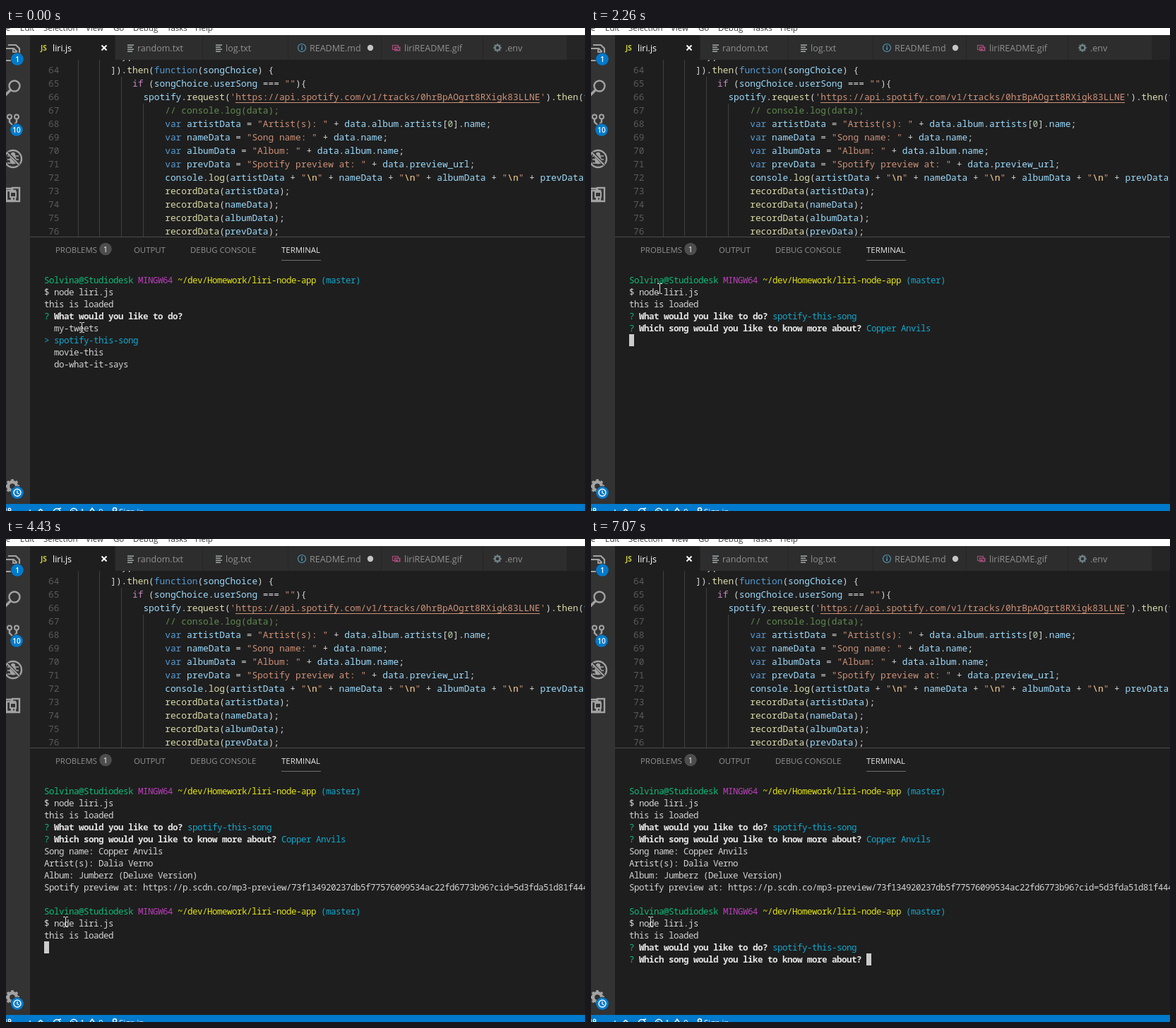
Recreate the animation shown at these times as an HTML page with a canvas. Size 820x683 px, loop 8 s.

```html
<!DOCTYPE html>
<html lang="en">
<head>
<meta charset="utf-8">
<title>Editor with terminal</title>
<style>
html, body { margin: 0; width: 100%; height: 100%; overflow: hidden; background: #1e1e1e; }
canvas { display: block; }
</style>
</head>
<body>
<canvas id="stage" width="820" height="683"></canvas>
<script>
const LOOP = 8000, TAU = Math.PI * 2;
const MONO = '"Noto Sans Mono", monospace', SANS = '"Open Sans", sans-serif';
const stage = document.getElementById('stage');
const backdrop = document.createElement('canvas');
backdrop.width = stage.width;
backdrop.height = stage.height;
let ctx = backdrop.getContext('2d');

// ---- drawing helpers ----
function rect(x, y, w, h, color) {
  ctx.fillStyle = color;
  ctx.fillRect(x, y, w, h);
}
function disc(x, y, r, color) {
  ctx.fillStyle = color;
  ctx.beginPath();
  ctx.arc(x, y, r, 0, TAU);
  ctx.fill();
}
function ring(x, y, r, color, width = 1) {
  ctx.strokeStyle = color;
  ctx.lineWidth = width;
  ctx.beginPath();
  ctx.arc(x, y, r, 0, TAU);
  ctx.stroke();
}
function line(color, width, ...points) {
  ctx.strokeStyle = color;
  ctx.lineWidth = width;
  ctx.beginPath();
  for (let i = 0; i < points.length; i += 2) ctx.lineTo(points[i], points[i + 1]);
  ctx.stroke();
}
function box(x, y, w, h, color, width = 2) {
  ctx.strokeStyle = color;
  ctx.lineWidth = width;
  ctx.strokeRect(x, y, w, h);
}
function label(text, x, y, size, color, align = 'left', weight = '') {
  ctx.font = `${weight} ${size}px ${SANS}`;
  ctx.fillStyle = color;
  ctx.textAlign = align;
  ctx.fillText(text, x, y);
}
function cells(text, x, y, pitch, size, color, bold) {
  ctx.font = `${bold ? 'bold ' : ''}${size}px ${MONO}`;
  ctx.fillStyle = color;
  ctx.textAlign = 'left';
  [...text].forEach((ch, i) => ch !== ' ' && ctx.fillText(ch, x + i * pitch, y));
}
function clipped(x, y, w, h, draw) {
  ctx.save();
  ctx.beginPath();
  ctx.rect(x, y, w, h);
  ctx.clip();
  draw();
  ctx.restore();
}
function gear(x, y, r, color, hole) {
  ring(x, y, r * 0.6, color, r * 0.45);
  for (let i = 0; i < 8; i++) {
    const c = Math.cos(i * TAU / 8), s = Math.sin(i * TAU / 8);
    line(color, r * 0.36, x + c * r * 0.7, y + s * r * 0.7, x + c * r, y + s * r);
  }
  disc(x, y, r * 0.33, hole);
}

// ---- editor ----
const CODE_X = 102, CODE_PITCH = 7.7;
const URL_TEXT = 'https://api.spotify.com/v1/tracks/0hrBpAOgrt8RXigk83LLNE';
const CODE = [
  [8, '},'],
  [6, ']).then(function(songChoice) {'],
  [10, 'if (songChoice.userSong === ""){'],
  [12, `spotify.request('${URL_TEXT}').then(function`],
  [16, '// console.log(data);'],
  [16, 'var artistData = "Artist(s): " + data.album.artists[0].name;'],
  [16, 'var nameData = "Song name: " + data.name;'],
  [16, 'var albumData = "Album: " + data.album.name;'],
  [16, 'var prevData = "Spotify preview at: " + data.preview_url;'],
  [16, 'console.log(artistData + "\\n" + nameData + "\\n" + albumData + "\\n" + prevData);'],
  [16, 'recordData(artistData);'],
  [16, 'recordData(nameData);'],
  [16, 'recordData(albumData);'],
  [16, 'recordData(prevData);']
];
const RULES = [
  [/^\/\/.*/, '#608b4e'],
  [/^(var|function)\b/, '#569cd6'],
  [/^if\b/, '#c586c0'],
  [/^("[^"]*"|'[^']*')/, '#ce9178'],
  [/^\w+(?=\()/, '#dcdcaa'],
  [/^\d+/, '#b5cea8'],
  [/^[a-z]\w*/i, '#9cdcfe'],
  [/^./, '#d4d4d4']
];
function codeLine(text, col, y) {
  while (text) {
    const [rule, color] = RULES.find(([re]) => re.test(text));
    const token = text.match(rule)[0];
    cells(token, CODE_X + col * CODE_PITCH, y, CODE_PITCH, 12.83, color);
    const escape = token.indexOf('\\n');
    if (escape >= 0) {
      cells('\\n', CODE_X + (col + escape) * CODE_PITCH, y, CODE_PITCH, 12.83, '#d7ba7d');
    }
    col += token.length;
    text = text.slice(token.length);
  }
}
function editor() {
  clipped(34, 45, 786, 250, () => {
    const guideTops = [45, 45, 69, 107];
    guideTops.forEach((top, i) => rect(Math.floor(CODE_X + i * 4 * CODE_PITCH), top, 1, 295 - top, '#404040'));
    CODE.forEach(([col, text], i) => {
      const y = 45 + i * 19;
      if (i) cells(String(63 + i), 60, y, CODE_PITCH, 12.83, '#5a5a5a');
      codeLine(text, col, y);
    });
    rect(325, 105, 431, 1, '#ce9178');
  });
}

// ---- window chrome ----
function menuBar() {
  rect(0, 0, 820, 10, '#ffffff');
  const items = { File: -12, Edit: 20, Selection: 53, View: 113, Go: 152, Debug: 180, Tasks: 228, Help: 268 };
  for (const name in items) label(name, items[name], 4, 11.5, '#333333');
}
function textIcon(x) {
  [24, 27, 30, 33].forEach((y, i) => rect(x, y - 0.5, i % 2 ? 7 : 9, 1.3, '#b4bbc0'));
}
function tabs() {
  rect(34, 10, 786, 35, '#252526');
  const list = [
    ['liri.js', 34, 120, 66], ['random.txt', 155, 123, 186], ['log.txt', 279, 120, 311],
    ['README.md', 400, 131, 430], ['liriREADME.gif', 532, 143, 564], ['.env', 676, 118, 707]
  ];
  list.forEach(([name, x, w, textX], i) => {
    rect(x, 10, w, 35, i ? '#2d2d2d' : '#1e1e1e');
    label(name, textX, 33, 12.5, i ? '#919191' : '#ffffff');
  });
  label('JS', 49, 32, 10, '#cbcb41', 'left', 'bold');
  line('#ffffff', 2, 135.5, 24.5, 142.5, 31.5);
  line('#ffffff', 2, 142.5, 24.5, 135.5, 31.5);
  textIcon(172);
  textIcon(297);
  ring(419, 28, 5.5, '#519aba', 1.2);
  rect(418.3, 27, 1.6, 4, '#519aba');
  rect(418.3, 24.6, 1.6, 1.5, '#519aba');
  disc(516, 28, 4.2, '#c5c5c5');
  box(547.5, 24.5, 8, 6, '#a04c78', 1.2);
  rect(550, 26.5, 8.5, 6, '#a04c78');
  rect(551.5, 28, 5, 3, '#2d2d2d');
  rect(552, 29, 3, 2, '#a04c78');
  gear(696, 28, 5.8, '#6d8086', '#2d2d2d');
}
function badge(x, y, text) {
  disc(x, y, 9.5, '#333333');
  disc(x, y, 8.8, '#007acc');
  if (text) return label(text, x, y + 4, 10, '#ffffff', 'center', '600');
  ring(x, y, 5, '#ffffff', 1.4);
  line('#ffffff', 1.3, x, y - 3, x, y + 0.5, x + 2.5, y + 2);
}
function sidebar() {
  const tone = '#a3a3a3';
  rect(0, 10, 34, 663, '#333333');
  // files
  line(tone, 2.2, 0, 29, 11, 29, 15, 33, 15, 46, 0, 46);
  line(tone, 2.2, 3, 24, 14, 24, 19, 29, 19, 40);
  line(tone, 1.8, 10, 29, 10, 34, 15, 34);
  // search
  ring(12, 82, 7.5, tone, 2.4);
  line(tone, 3.4, 7, 87, -2, 96);
  // source control
  line(tone, 2.4, 5, 128, 5, 133, 10, 138, 10, 146);
  line(tone, 2.4, 15, 128, 15, 133, 10, 138);
  ring(5, 125.5, 3, tone, 2);
  ring(15, 125.5, 3, tone, 2);
  // debug
  ring(10, 185, 12, tone, 2.4);
  ctx.fillStyle = tone;
  ctx.beginPath();
  ctx.ellipse(10, 186, 4.8, 6.5, 0, 0, TAU);
  ctx.fill();
  disc(10, 179, 3.2, tone);
  for (const y of [181, 186, 191]) line(tone, 1.6, 2, y, 18, y);
  line('#333333', 4, 2, 176, 19, 194);
  line(tone, 2.2, 1, 176, 19, 194);
  // extensions
  line(tone, 2.4, 0, 227, 8, 227, 8, 245, 0, 245);
  box(1, 230, 12, 14, tone, 2.4);
  box(9, 226, 10, 19, tone, 2.4);
  rect(5, 231, 10, 9, '#333333');
  box(6, 232, 8, 7, tone, 2);
  gear(9, 648, 10, tone, '#333333');
  badge(16, 44, '1');
  badge(16, 657);
}
function panelHeader() {
  rect(34, 295, 786, 1, '#4b4b4b');
  const titles = { PROBLEMS: 70, OUTPUT: 181, 'DEBUG CONSOLE': 261, TERMINAL: 390 };
  for (const name in titles) {
    label(name, titles[name], 318, 11.4, name === 'TERMINAL' ? '#e7e7e7' : '#929292');
  }
  rect(390, 328, 56, 1, '#6c6c6c');
  disc(141, 312.5, 8.7, '#4d4d4d');
  label('1', 141, 316.5, 11, '#ffffff', 'center');
}
function statusBar() {
  const white = '#ffffff';
  rect(0, 673, 820, 10, '#007acc');
  ring(5, 681, 1.8, white, 1.3);
  line(white, 1.3, 0, 679, 0, 683);
  line(white, 1.3, 34, 681, 34, 683);
  line(white, 1.4, 46, 683, 49, 680.5, 52, 683);
  ring(72, 684, 4.5, white, 1.5);
  line(white, 1.5, 74, 680, 78, 679);
  ring(96, 684, 4.7, white, 1.4);
  line(white, 1.4, 94, 682, 97, 685);
  label('1', 105, 688, 11.5, white);
  line(white, 1.4, 117, 686, 122, 679, 127, 686);
  label('0', 131, 688, 11.5, white);
  ring(154, 681, 2.5, white, 1.4);
  label('Sign in', 160, 688, 11.5, white);
}

// ---- terminal ----
const GREEN = '#0dbc79', CYAN = '#11a8cd', PURPLE = '#bc3fbc', YELLOW = '#e5e510';
const PLAIN = '#d4d4d4', BRIGHT = '#e5e5e5';
const CELL_W = 7, CELL_H = 17, TERM_X = 54, TERM_Y = 348;
const SONG = 'Copper Anvils';
const CHOICES = ['my-tweets', 'spotify-this-song', 'movie-this', 'do-what-it-says'];

function print(row, ...parts) {
  let col = 0;
  for (const [text, color = PLAIN, bold] of parts) {
    cells(text, TERM_X + col * CELL_W, TERM_Y + row * CELL_H + 13, CELL_W, 12.5, color, bold);
    col += text.length;
  }
}
function caret(row, col) {
  rect(TERM_X + col * CELL_W, TERM_Y + row * CELL_H, CELL_W, CELL_H, '#cccccc');
}
function prompt(row) {
  print(row, ['Solvina@Studiodesk ', GREEN], ['MINGW64 ', PURPLE],
    ['~/dev/Homework/liri-node-app ', YELLOW], ['(master)', CYAN]);
}
function ask(row, question, answer = '', color = CYAN) {
  print(row, ['? ', GREEN], [question + ' ', BRIGHT, true], [answer, color]);
}
function askAction(row, answer, color) {
  ask(row, 'What would you like to do?', answer, color);
}
function askSong(row, answer, color) {
  ask(row, 'Which song would you like to know more about?', answer, color);
}
function menu(row, picked) {
  CHOICES.forEach((choice, i) => {
    const on = i === picked;
    print(row + i, [(on ? '> ' : '  ') + choice, on ? CYAN : PLAIN]);
  });
}
function firstRun(t) {
  prompt(0);
  print(1, ['$ node liri.js']);
  print(2, ['this is loaded']);
  if (t < 300) {
    askAction(3);
    return menu(4, 1);
  }
  askAction(3, CHOICES[1]);
  if (t < 2260) {
    const typed = SONG.slice(0, t < 1880 ? 0 : t < 1960 ? 8 : SONG.length);
    askSong(4, typed, PLAIN);
    return caret(4, 48 + typed.length);
  }
  askSong(4, SONG);
  if (t < 2410) return caret(5, 0);
  print(5, ['Song name: ' + SONG]);
  print(6, ['Artist(s): Dalia Verno']);
  print(7, ['Album: Jumberz (Deluxe Version)']);
  print(8, ['Spotify preview at: https://p.scdn.co/mp3-preview/' +
    '73f134920237db5f77576099534ac22fd6773b96?cid=5d3fda51d81f444']);
}
function secondRun(t) {
  prompt(10);
  print(11, [t < 3500 ? '$' : '$ node liri.js']);
  if (t < 4200) return caret(11, t < 3500 ? 2 : 14);
  if (t < 4430) return caret(12, 0);
  print(12, ['this is loaded']);
  if (t < 5290) return caret(13, 0);
  if (t < 7070) {
    const moved = t >= 6920;
    askAction(13, moved ? '' : '(Use arrow keys)', PLAIN);
    return menu(14, moved ? 1 : 0);
  }
  askAction(13, CHOICES[1]);
  askSong(14);
  caret(14, 48);
}
function pointer(t) {
  const [x, y] = t < 700 ? [107, 423] : t < 3500 ? [97, 368] : [84, 541];
  const color = '#e0e0e0';
  rect(x, y - 6, 1, 13, color);
  for (const end of [y - 7, y + 7]) {
    rect(x - 3, end, 3, 1, color);
    rect(x + 1, end, 3, 1, color);
  }
}

function drawBackdrop() {
  rect(0, 0, 820, 683, '#1e1e1e');
  menuBar();
  tabs();
  editor();
  panelHeader();
  sidebar();
  statusBar();
}
function frame(now) {
  const t = now % LOOP;
  ctx.drawImage(backdrop, 0, 0);
  badge(15, 144, t >= 3190 && t < 3270 ? '' : '10');
  firstRun(t);
  if (t >= 2410) secondRun(t);
  pointer(t);
  requestAnimationFrame(frame);
}

drawBackdrop();
ctx = stage.getContext('2d');
const start = performance.now();
requestAnimationFrame(() => frame(0));
const tick = frame;
frame = now => tick(Math.max(0, now - start));
</script>
</body>
</html>
```
